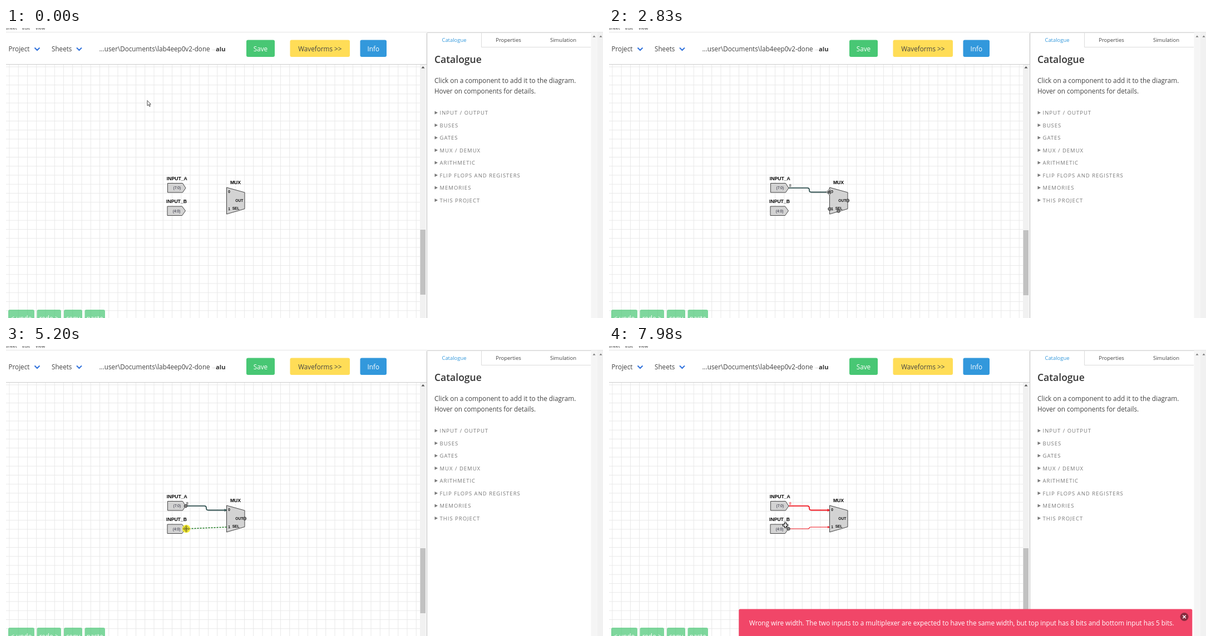
Write an HTML page that moves like this. It is 1073 by 522 pixels and loops after 8 s.

```html
<!DOCTYPE html>
<html lang="en">
<head>
<meta charset="utf-8">
<title>Wire width check</title>
<style>
  html, body { margin: 0; height: 100%; overflow: hidden; background: #fff; }
  svg { display: block; width: 1073px; height: 522px; }
  text { font: 11.7px "Open Sans", "Noto Sans", sans-serif; fill: #444; white-space: pre; }
  .mid { text-anchor: middle; }
  .white { fill: #fff; }
  .menu { font-size: 7.9px; fill: #333; }
  .tab { font-size: 9.45px; }
  .item { font-size: 9.5px; letter-spacing: 1px; fill: #777; }
  .label { font: bold 8.65px "Liberation Sans", Arial, sans-serif; fill: #000; }
  .pin { font: bold 6.6px "Liberation Sans", Arial, sans-serif; fill: #111; }
  .bits { font: 6.7px "Liberation Sans", Arial, sans-serif; fill: #223; }
  .symbol { fill: #d3d3d3; stroke: #333; stroke-width: .9; }
  .port { fill: #808080; stroke: #333; stroke-width: .9; }
  .chevron { fill: none; stroke: #3273dc; stroke-width: 2; }
  .arrow { fill: #777; }
  .rule { fill: none; stroke: #dbdbdb; }
</style>
</head>
<body>
<svg viewBox="0 0 1073 522">
  <defs>
    <pattern id="grid" x="5.5" y="69.5" width="16.25" height="16.25" patternUnits="userSpaceOnUse">
      <path d="M.5 0V16.25M0 .5H16.25" stroke="#e8e8e8" fill="none"/>
    </pattern>
  </defs>

  <text class="menu" x="-1" y="3">Sheet</text>
  <text class="menu" x="29" y="3">Edit</text>
  <text class="menu" x="53" y="3">View</text>
  <path class="rule" d="M0 7.5H1073" style="stroke:#e4e4e4"/>

  <text x="4.5" y="41.5">Project</text>
  <text x="82" y="41.5">Sheets</text>
  <path class="chevron" d="M51.5 35.5l4.5 4.5 4.5-4.5M127 35.5l4.5 4.5 4.5-4.5"/>
  <text x="167.5" y="41.5">...user\Documents\lab4eep0v2-done</text>
  <text x="368" y="41" style="font-size:9px;fill:#bbb">→</text>
  <text x="377" y="41.5" style="font-size:11.2px;font-weight:700;fill:#363636">alu</text>
  <rect x="432" y="21.5" width="51" height="30.5" rx="3" fill="#48c774"/>
  <rect x="510.5" y="21.5" width="107.5" height="30.5" rx="3" fill="#ffdd57"/>
  <rect x="636.5" y="21.5" width="47.5" height="30.5" rx="3" fill="#3298dc"/>
  <text class="mid white" x="457.5" y="41.5">Save</text>
  <text class="mid" x="564.3" y="41.5">Waveforms &gt;&gt;</text>
  <text class="mid white" x="660.3" y="41.5">Info</text>

  <path class="rule" d="M0 65.5H756" style="stroke:#ccc"/>
  <rect y="66" width="744" height="456" fill="url(#grid)"/>
  <rect x="744" y="66" width="11" height="456" fill="#f1f1f1"/>
  <path class="arrow" d="M746.5 72.5l3-3.5 3 3.5z" style="fill:#505050"/>
  <rect id="thumb" x="744.5" y="363" width="9.5" height="117" fill="#c1c1c1"/>
  <path class="rule" d="M756.5 9V522" style="stroke:#bbb"/>

  <path class="rule" d="M757 8.5H1052M854.5 9V34.5H1051"/>
  <rect x="1051.5" y="8" width="11" height="514" fill="#f5f5f5"/>
  <rect x="1062.5" y="8" width="10.5" height="514" fill="#f1f1f1"/>
  <path class="arrow" d="M1054.5 16.5l2.5-3 2.5 3zM1066.5 16.5l2.5-3 2.5 3z"/>
  <text class="tab mid" x="805.5" y="25" style="fill:#3298dc">Catalogue</text>
  <text class="tab mid" x="903" y="25">Properties</text>
  <text class="tab mid" x="1001.5" y="25">Simulation</text>
  <text x="770" y="63" style="font-size:17.5px;font-weight:600;fill:#363636">Catalogue</text>
  <text x="770" y="99" style="font-size:11.8px">Click on a component to add it to the diagram.</text>
  <text x="770" y="117.7">Hover on components for details.</text>
  <g id="catalogue"></g>

  <g id="edits" opacity=".7"></g>

  <g id="wires" fill="none">
    <g id="wireA">
      <path d="M323 287.8H356.5Q360 287.8 360 291.3V292Q360 295.5 363.5 295.5H396" stroke-width="1.8"/>
      <path class="tip" d="M393 293.5l3.5 2-3.5 2z"/>
    </g>
    <g id="wireB">
      <path d="M322.5 329H357Q360 329 360 327.5Q360 326 363 326H396" stroke-width="1.1"/>
      <path class="tip" d="M393.5 324.5l3 1.5-3 1.5z"/>
    </g>
  </g>
  <text id="width" class="bits" x="323.7" y="286" style="font-size:7.3px">8</text>

  <path class="symbol" d="M290.5 279.5H317.5L323 288 317.5 296H290.5zM290 321H316.5L322.5 329 316.5 337.5H290z"/>
  <path class="symbol" d="M396.5 287L429 296V325.5L396.5 335z"/>
  <text class="label" x="288.8" y="273.5">INPUT_A</text>
  <text class="label" x="288" y="315">INPUT_B</text>
  <text class="label mid" x="412.5" y="280.7">MUX</text>
  <text class="bits mid" x="307.3" y="290.3">(7:0)</text>
  <text class="bits mid" x="306.7" y="332">(4:0)</text>
  <text class="pin" x="399.2" y="297.3">0</text>
  <text class="pin" x="399.2" y="327.5">1</text>
  <text class="pin" x="412.3" y="312.5">OUT</text>
  <text class="pin" x="406.7" y="326.5">SEL</text>

  <g id="ports"></g>
  <line id="drag" stroke="#17761b" stroke-width="1.5" stroke-dasharray="3 2"/>

  <g id="notice">
    <rect x="233.3" y="473.5" width="815" height="50" rx="2.5" fill="#f14668"/>
    <text class="white" x="252" y="503.2">Wrong wire width. The two inputs to a multiplexer are expected to have the same width, but top input has 8 bits and bottom input has 5 bits.</text>
    <circle cx="1034" cy="487.5" r="7.5" fill="#0a0a0a" fill-opacity=".45"/>
    <path d="M1031.3 484.8l5.4 5.4m0-5.4l-5.4 5.4" stroke="#fff" stroke-width="1.5"/>
  </g>

  <g id="cursor" stroke-width=".8">
    <circle id="press" r="7.3" fill="#f8ec1a" fill-opacity=".85"/>
    <path id="pointer" d="M0 0V9.3L2.2 7.4 3.8 10.8 5.3 10.1 3.7 6.8H6.3z" fill="#fff" stroke="#222"/>
    <g id="move" stroke="#333" stroke-width=".6"></g>
    <path id="plus" d="M-1.5-4.5h3v3h3v3h-3v3h-3v-3h-3v-3h3z" fill="#fff" stroke="#000" stroke-width="1.1"/>
  </g>
</svg>
<script>
const LOOP = 8000;
const el = id => document.getElementById(id);
const show = (node, on) => { node.style.display = on ? '' : 'none'; };
const within = (t, ...spans) => spans.some(([from, to]) => t >= from && t < to);

el('catalogue').innerHTML = ['INPUT / OUTPUT', 'BUSES', 'GATES', 'MUX / DEMUX', 'ARITHMETIC',
  'FLIP FLOPS AND REGISTERS', 'MEMORIES', 'THIS PROJECT'].map((name, i) => {
  const y = 152.5 + i * 22.5;
  return `<path class="arrow" d="M770.5 ${y - 3}l5.5 3-5.5 3z"/>
    <text class="item" x="779.5" y="${y + 3.5}">${name}</text>`;
}).join('');

el('edits').innerHTML = [['&lt; undo', 4, 47], ['redo &gt;', 55.5, 43.5], ['copy', 104, 33], ['paste', 141.5, 36.5]]
  .map(([name, x, w]) => `<rect x="${x}" y="507" width="${w}" height="30" rx="3" fill="#48c774"/>
    <text class="mid white" x="${x + w / 2}" y="526.5">${name}</text>`).join('');

el('move').innerHTML = [0, 90, 180, 270].map(a =>
  `<path transform="rotate(${a})" d="M0-6L2-3.6H.7V-1.4H-.7V-3.6H-2z"/>`).join('') +
  '<circle r=".6" fill="#333"/>';

// x, y, then the spans of time in which the port is visible
const ports = [
  [323, 288, [950, 1700], [4120, 7700]],
  [322.5, 329, [4120, LOOP]],
  [396.5, 295.5, [1240, 4120]],
  [396.5, 325.7, [1240, 4120]],
  [412.5, 329.5, [1240, 4120]],
  [429, 310.6, [2830, 6900]]
];
el('ports').innerHTML = ports.map(([x, y]) => `<circle class="port" cx="${x}" cy="${y}" r="2.8"/>`).join('');

// time, x, y of the cursor
const path = [
  [0, 254, 130.5], [340, 254, 130.5], [1100, 323.5, 288], [1600, 324, 288], [2300, 396, 295],
  [3060, 396, 295], [3600, 397, 327.5], [4350, 397, 327.5], [5200, 324, 329],
  [6730, 324, 329], [7250, 291, 345], [7930, 317, 322.5], [LOOP, 317, 322.5]
];

function cursorAt(t) {
  const i = path.findIndex(p => p[0] > t);
  const [t0, x0, y0] = path[i - 1], [t1, x1, y1] = path[i];
  const u = (t - t0) / (t1 - t0), k = u * u * (3 - 2 * u);
  return [x0 + (x1 - x0) * k, y0 + (y1 - y0) * k];
}

function draw(t) {
  const [x, y] = cursorAt(t);
  const failed = t >= 5730;
  const colour = failed ? '#f0141e' : '#2f4f4f';
  const pointing = within(t, [0, 1000], [6900, 7400]);
  const crossing = t >= 7400;
  const pressed = within(t, [1240, 2830], [4120, 5730]);

  el('thumb').setAttribute('y', within(t, [0, 400], [5730, 6830]) ? 363 : 364);
  ports.forEach(([, , ...spans], i) => show(el('ports').children[i], within(t, ...spans)));

  show(el('wireA'), t >= 2830);
  show(el('width'), t >= 2830);
  show(el('wireB'), failed);
  show(el('notice'), failed);
  el('wires').setAttribute('stroke', colour);
  el('width').style.fill = failed ? colour : '#222';

  const drag = el('drag'), [sx, sy] = t < 4000 ? [323, 288] : [396.5, 326];
  show(drag, within(t, [1600, 2830], [4300, 5730]));
  Object.entries({ x1: sx, y1: sy, x2: x, y2: y }).forEach(([k, v]) => drag.setAttribute(k, v));

  el('cursor').setAttribute('transform', `translate(${x} ${y})`);
  show(el('press'), pressed);
  show(el('pointer'), pointing);
  show(el('plus'), crossing);
  show(el('move'), !pointing && !crossing);
  el('move').setAttribute('fill', pressed ? '#f8ec1a' : '#fff');
}

const start = performance.now();
function frame() {
  draw((performance.now() - start) % LOOP);
  requestAnimationFrame(frame);
}
frame();
</script>
</body>
</html>
```
